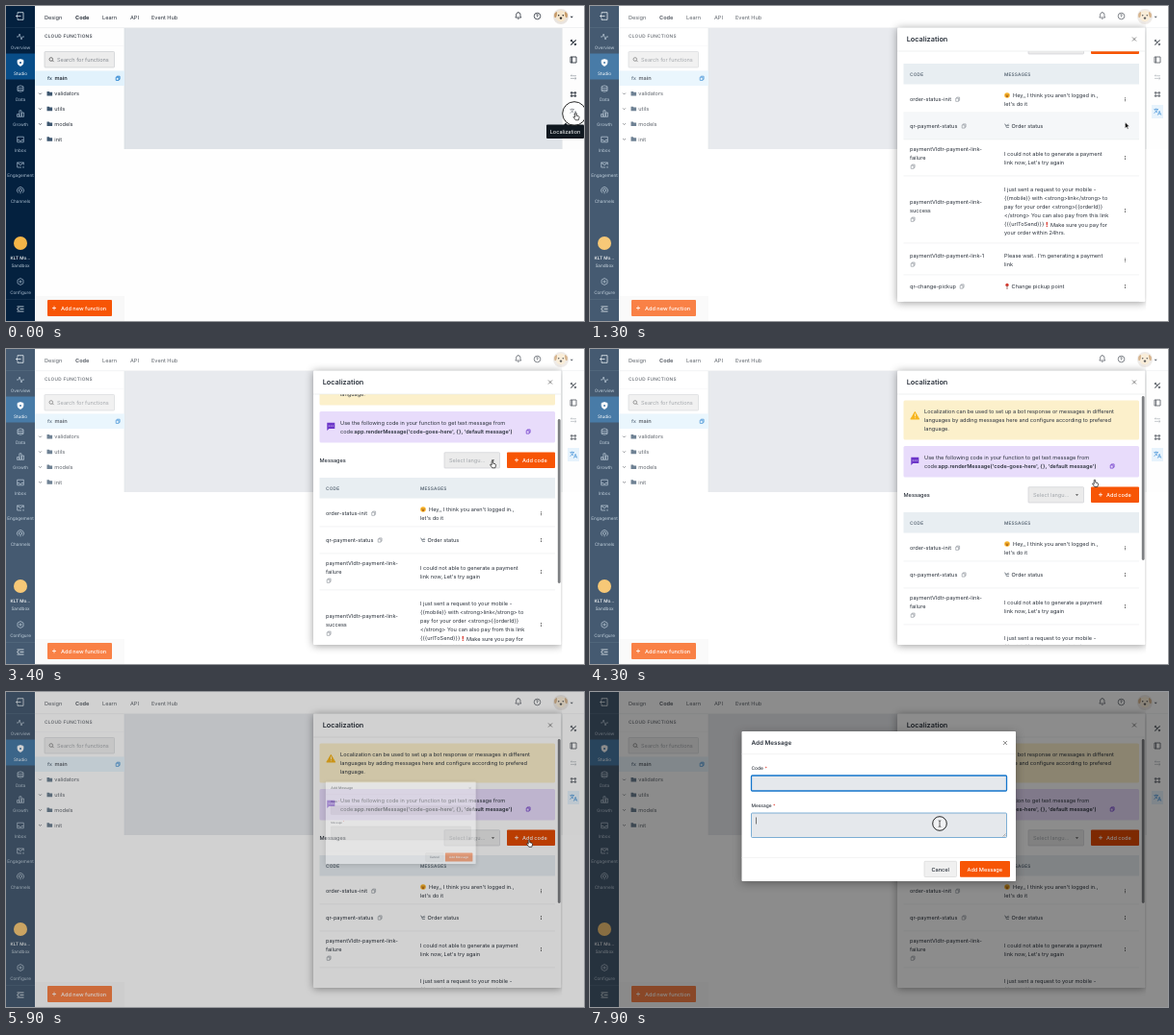
Animation of 600x328 px, one loop 8 s. Source, as an HTML page:

```html
<!DOCTYPE html>
<html lang="en">
<head>
<meta charset="utf-8">
<style>
html, body { margin: 0; width: 100%; height: 100%; overflow: hidden; background: #fff; }
svg { display: block; width: 100vw; height: 100vh; }
text { font-family: Inter, "Open Sans", sans-serif; text-rendering: geometricPrecision; white-space: pre; }
</style>
</head>
<body>
<svg id="stage" viewBox="0 0 600 328"></svg>
<script>
const LOOP = 8000, INK = '#2b323c', GREY = '#7b828b', ORANGE = '#f75505', BLUE = '#1476cc';

const text = (x, y, s, o = {}) => {
  const { size = 5.6, fill = INK, w = 400, a = 'start', ls = 0 } = o;
  const safe = s.replace(/</g, '&lt;');
  return `<text x="${x}" y="${y + size * .36}" font-size="${size}" font-weight="${w}" fill="${fill}" text-anchor="${a}" letter-spacing="${ls}">${safe}</text>`;
};
const rect = (x, y, w, h, fill, extra = '') =>
  `<rect x="${x}" y="${y}" width="${w}" height="${h}" fill="${fill}" ${extra}/>`;
const box = (x, y, w, h, fill, stroke) =>
  rect(x, y, w, h, fill, `rx=".8" stroke="${stroke}" stroke-width=".6"`);
const icon = (x, y, d, stroke = INK, w = .8, fill = 'none') =>
  `<path transform="translate(${x} ${y})" d="${d}" stroke="${stroke}" stroke-width="${w}" fill="${fill}" stroke-linejoin="round"/>`;
const dot = (x, y, r, fill) => `<circle cx="${x}" cy="${y}" r="${r}" fill="${fill}"/>`;
const lines = (x, ys, list, o) => list.map((s, i) => text(x, ys[i], s, o)).join('');

const COPY = 'M-1.8-1.1H1.1V2.1H-1.8ZM-.8-1.1V-2.1H2.1V1.1H1.1';
const CROSS = 'M-2-2L2 2M2-2L-2 2';
const PLUS = 'M-2 0H2M0-2V2';
const CARET = 'M-1.6-.8H1.6L0 1.1Z';
const copy = (x, y, c = GREY, w = .55) => icon(x, y, COPY, c, w);

function sidebar() {
  const items = [
    ['Overview', 32, 'M-4 0H-2L-.9-3L1 3L2 0H4'],
    ['Studio', 59, 'M0-3.6L3-2.6V0Q3 2.5 0 3.6Q-3 2.5-3 0V-2.6Z'],
    ['Data', 86, 'M-3-2.2Q0-4 3-2.2V2.4Q0 4-3 2.4ZM-3-1Q0 .5 3-1M-3 1Q0 2.5 3 1'],
    ['Growth', 112, 'M-3.5 3.3V.6H-1.4V3.3ZM-1.1 3.3V-3.2H1V3.3ZM1.4 3.3V-1H3.5V3.3Z'],
    ['Inbox', 139, 'M-3.3-2.8H3.3V2.8H-3.3ZM-3.3 .6H-1.2L-.6 1.6H.6L1.2 .6H3.3'],
    ['Engagement', 165.5, 'M3.3 0V-2.5H-3.3V2.5H1M-3.3-2.5L0 .3L3.3-2.5M2 2.4H4'],
    ['Channels', 192, 'M-2.4 2.6A3.5 3.5 0 1 1 2.4 2.6M-1.2 1.2A1.7 1.7 0 1 1 1.2 1.2M0 0V3.4'],
    ['Configure', 287, 'M0-3.5L3-1.8V1.8L0 3.5L-3 1.8V-1.8ZM-1 0A1 1 0 1 1 1 0A1 1 0 1 1-1 0']
  ];
  let s = rect(0, 0, 30, 328, '#04213f') + rect(0, 22, 30, .6, '#1d3b58') +
    rect(0, 49.5, 30, 27, '#084d88') + rect(0, 305, 30, .6, '#1d3b58');
  for (const [name, y, d] of items) {
    const on = name === 'Studio', c = on ? '#fff' : '#a9bccf';
    s += icon(15, y, d, c, .7, on ? '#fff' : 'none') +
      text(15, y + 11, name, { size: 4.65, fill: c, a: 'middle' });
  }
  return s + dot(15, 59, 1, '#084d88') +
    icon(14.5, 10.5, 'M-2.5-2V-3.8H3.5V3.8H-2.5V2M1 0H-4M-2.5-1.5L-4 0L-2.5 1.5', '#dfe7ee') +
    dot(15, 247, 7, '#f4b548') +
    text(15, 262, 'KLT Mo...', { size: 4.65, fill: '#fff', w: 500, a: 'middle' }) +
    text(15, 270, 'Sandbox', { size: 4.65, fill: '#b9c8d6', a: 'middle' }) +
    icon(15, 315.5, 'M-3.5-2.5H3.5M-.5 0H3.5M-3.5 2.5H3.5M-1.5-1.4L-3.5 0L-1.5 1.4', '#dfe7ee');
}

function topBar() {
  const tabs = [['Design', 40], ['Code', 72], ['Learn', 100], ['API', 129], ['Event Hub', 151]];
  return rect(30, 22.5, 570, .6, '#e4e6e8') +
    tabs.map(([s, x]) => text(x, 11.5, s, { w: s === 'Code' ? 700 : 400 })).join('') +
    icon(531.8, 10, 'M-3 2H3L2.2 .8V-1A2.2 2.2 0 0 0-2.2-1V.8ZM-.8 3.2H.8M0-3.2V-4') +
    icon(551.5, 10.5, 'M-3.3 0A3.3 3.3 0 1 1 3.3 0A3.3 3.3 0 1 1-3.3 0') +
    text(551.5, 10.5, '?', { size: 5, w: 700, a: 'middle' }) +
    dot(576, 11, 8, '#e9e4df') +
    icon(576, 11, 'M-5-4Q0-9 5-4L4.5 3Q0 8-4.5 3Z', 'none', 0, '#f6e6cc') +
    icon(576, 11, 'M-4-5Q-8-4-6.5 1Q-4 2-4-5M4-5Q8-4 6.5 1Q4 2 4-5', 'none', 0, '#c79a66') +
    dot(573.7, 9.8, .8, '#222') + dot(578.3, 9.8, .8, '#222') + dot(576, 12.6, 1.2, '#222') +
    icon(587.2, 11.5, CARET, 'none', 0, INK);
}

function functionList() {
  let s = rect(123, 23, 454.5, 126, '#dfe3e8') + rect(122.7, 23, .6, 126, '#d5d9dd') +
    text(40, 31.5, 'CLOUD FUNCTIONS', { size: 4.75, w: 500, ls: .25 }) +
    rect(30, 41, 93, .4, '#eceef0') +
    box(40, 47.5, 72.5, 16.5, '#ececec', '#c5c8cb') +
    icon(47, 55.5, 'M1.2 1.2L2.6 2.6M-2 0A1.8 1.8 0 1 1 1.6 0A1.8 1.8 0 1 1-2 0', '#555') +
    text(53, 56, 'Search for functions', { fill: '#858a90' }) +
    rect(30, 67.5, 93, 15.5, '#e2f2fc') +
    text(43, 75, 'fx', { size: 5, w: 600, fill: '#31495f' }) + text(50.5, 75.3, 'main', { w: 600 }) +
    copy(116, 75.3, BLUE, .8);
  ['validators', 'utils', 'models', 'init'].forEach((name, i) => {
    const y = 91.2 + i * 15.8;
    s += icon(35.5, y, 'M-1.4-.6L0 .8L1.4-.6', INK, .7) +
      icon(45.3, y, 'M-2.8-2.3H-.6L.2-1.4H2.8V2.2H-2.8Z', 'none', 0, '#3d566f') + text(50.3, y + .2, name);
  });
  return s + rect(30, 302, 93, 26, '#f8f8f8') + rect(43, 306, 67, 17, ORANGE, 'rx="1"') +
    icon(50, 314.5, PLUS, '#fff') + text(57, 314.5, 'Add new function', { fill: '#fff', w: 500 });
}

function rail() {
  return rect(577.5, 23, 22.5, 126, '#fdfdfd') + rect(577.3, 23, .5, 126, '#e2e4e6') +
    rect(583, 103, 12, 14, '#deeefb', 'id="railOn"') +
    icon(589, 38, 'M-2.7-2.7L2.7 2.7M2.7-2.7L-2.7 2.7M-3-1.4L-1.4-3M1.4 3L3 1.4', INK, 1.1) +
    icon(589, 56, 'M-3-3H3V3H-3ZM-1.5-3V3', INK, .9) +
    icon(589, 74, 'M-3-1.3H3M-1.6-2.5L-3-1.3M3 1.4H-3M1.6 .3L3 1.4L1.6 2.6', '#9aa0a6', .7) +
    icon(589, 92, 'M-3.2-1.7H3.2M-3.2 1.7H3.2M-1.9-3V3M1.9-3V3', INK, .9) +
    `<g id="lang">${icon(589, 110, 'M-3.6-2.4H1M-1.3-3.4V-2.4M.2-2.4Q-.8 .3-3.5 1.5M-2.6-1.8Q-1.5 .2 0 .8M.4 3.6L2.1-.6L3.8 3.6M1.1 2.2H3.1', 'currentColor', .75)}</g>`;
}

// Table rows: top, bottom, code lines, message lines
const rows = [
  [192, 221, ['order-status-init'], ['      Hey,, I think you aren\'t logged in.,', 'let\'s do it']],
  [221, 249, ['qr-payment-status'], ['     Order status']],
  [249, 287, ['paymentVldtr-payment-link-', 'failure'], ['I could not able to generate a payment', 'link now, Let\'s try again']],
  [287, 357, ['paymentVldtr-payment-link-', 'success'], [
    'I just sent a request to your mobile -', '{{mobile}} with <strong>link</strong> to',
    'pay for your order <strong>{{orderId}}', '</strong> You can also pay from this link',
    '{{{urlToSend}}}', 'your order within 24hrs.']],
  [357, 390, ['paymentVldtr-payment-link-1'], ['Please wait.. I\'m generating a payment', 'link']],
  [390, 418, ['qr-change-pickup'], ['     Change pickup point']]
];
const inlineCopy = { 0: 381.5, 1: 388, 5: 386 };

function table() {
  let s = rect(325.5, 170, 244.5, 21.5, '#e8eef2') +
    text(332, 181, 'CODE', { size: 4.75, fill: '#465564', w: 500, ls: .2 }) +
    text(430, 181, 'MESSAGES', { size: 4.75, fill: '#465564', w: 500, ls: .2 });
  rows.forEach(([top, end, code, msg], i) => {
    const mid = i === 5 ? 402 : i === 3 ? 323 : i === 4 ? 374.5 : (top + end) / 2 + (i ? 0 : .7);
    const n = code.length + (i in inlineCopy ? 0 : 1);
    const cy = code.map((_, k) => mid + (k - (n - 1) / 2) * 9.2);
    const my = msg.map((_, k) => mid + .4 + (k - (msg.length - 1) / 2) * 9.1);
    s += rect(325.5, top, 244.5, end - top, '#f5f7f9', 'class="hover"') +
      rect(325.5, end - .3, 244.5, .5, '#e3e6e9') + lines(332, cy, code) +
      (i in inlineCopy ? copy(inlineCopy[i], mid) : copy(335, mid + (n - 1) / 2 * 9.2)) +
      msg.map((m, k) => {
        const gap = m.length - m.trimStart().length;
        return text(430 + (gap ? gap === 6 ? 9 : 7.6 : 0), my[k], m.trim());
      }).join('') + [-1.5, 0, 1.5].map(d => dot(555.5, mid + d, .5, '#333')).join('');
  });
  return s + dot(433, 203, 2.8, '#fbb52b') + dot(432, 202.2, .45, '#5a3310') + dot(434, 202.2, .45, '#5a3310') +
    icon(433, 203.5, 'M-1.6 0H1.6Q0 2.6-1.6 0', 'none', 0, '#8a3b12') +
    icon(432.8, 235.2, 'M-2.6-2.3L-1.4-1.7L-.5 1.2H2.2M-1-.8H2.4M1.6-2.4L.6-1', '#59636d', .7) +
    text(473, 337.5, '!', { size: 7, fill: '#d92b20', w: 800 }) + text(478, 337.5, 'Make sure you pay for') +
    dot(433, 400.4, 1.7, '#d63a2f') + rect(432.6, 401, .8, 4, '#8b5550');
}

function panelBody() {
  return rect(325.5, 53.5, 244.5, 41, '#fcf0cb', 'rx="1.5"') +
    icon(337.3, 69.3, 'M0-4L4.5 3.8H-4.5Z', '#f6b51e', .8, '#f6b51e') + rect(337, 67.3, .7, 3, '#fff') + dot(337.35, 71.7, .45, '#fff') +
    lines(347, [65, 74.2, 83.4], ['Localization can be used to set up a bot response or messages in different',
      'languages by adding messages here and configure according to prefered', 'language.']) +
    rect(325.5, 101, 244.5, 32.5, '#e8dcfb', 'rx="1.5"') +
    icon(337.3, 116.5, 'M-4-3.8H4V2.6H-2L-4 4.4Z', 'none', 0, '#6c35c9') +
    [-2, 0, 2].map(d => dot(337.3 + d, 116, .55, '#fff')).join('') +
    text(347, 112.7, 'Use the following code in your function to get text message from') +
    text(347, 122.3, 'code:') +
    text(361.5, 122.3, 'app.renderMessage(\'code-goes-here\', {}, \'default message\')', { w: 600, size: 5.55 }) +
    copy(542, 122, '#6c35c9', .7) +
    text(325.5, 152.3, 'Messages', { w: 500 }) +
    box(455, 143.7, 57.5, 16.3, '#ebebeb', '#c9ccd0') +
    text(460, 152.3, 'Select langu...', { fill: '#a3a7ac' }) + icon(505.5, 152, CARET, 'none', 0, '#555') +
    rect(520, 143.5, 50, 16.5, ORANGE, 'rx="1" id="addBtn"') + icon(530, 151.7, PLUS, '#fff') +
    text(536, 152, 'Add code', { fill: '#fff', w: 500 }) + table() +
    text(325.5, 425.4, 'Showing') + box(350, 419, 19, 12.5, '#ebebeb', '#c9ccd0') +
    text(353.5, 425.4, '6') + icon(363, 425.3, CARET, 'none', 0, '#555') + text(371, 425.4, 'of 234') +
    text(488, 425.4, 'Go to') + box(506.5, 419, 20, 12.5, '#fff', '#c9ccd0') +
    text(516.5, 425.4, '2', { a: 'middle' }) + text(530.5, 425.4, '/ 39') +
    box(546, 419, 11.5, 12.5, '#fff', '#c9ccd0') + box(558, 419, 11.5, 12.5, '#fff', '#c9ccd0') +
    icon(551.7, 425.2, 'M2 0H-2M-.6-1.5L-2 0L-.6 1.5') + icon(563.7, 425.2, 'M-2 0H2M.6-1.5L2 0L.6 1.5');
}

function modal() {
  const label = (y, s, w) => text(167.5, y, s, { size: 4.85, w: 500 }) + text(168.6 + w, y - .5, '*', { size: 4.8, fill: '#e23b2e' });
  return rect(157.5, 41, 284.5, 156, '#fff', 'rx="1" style="filter:drop-shadow(0 2px 5px #0005)"') +
    text(167.5, 53, 'Add Message', { size: 6.3, w: 600 }) + icon(431, 53, CROSS, '#666', .7) +
    rect(157.5, 64.3, 284.5, .5, '#e8e8e8') + label(79.3, 'Code', 13) +
    rect(167.5, 87, 265, 16, '#e7e7e7', 'rx="1" id="codeBox"') + label(118.3, 'Message', 21.5) +
    rect(167.5, 126, 265, 25.5, '#e7e7e7', 'rx="1" id="msgBox"') +
    icon(430, 149, 'M-1.5 1.5L1.5-1.5M.2 1.5L1.5 .2', '#777', .5) +
    rect(172.3, 130.5, .6, 7, '#222', 'id="caret"') +
    rect(157.5, 172, 284.5, .5, '#e8e8e8') + box(347, 176.3, 33.5, 16.2, '#f0f0f0', '#d5d5d5') +
    text(363.7, 184.5, 'Cancel', { w: 500, a: 'middle' }) +
    rect(384, 176, 52, 16.8, ORANGE, 'rx="1"') + text(409.8, 184.5, 'Add Message', { w: 500, fill: '#fff', a: 'middle' });
}

const pointers = {
  hand: icon(0, 0, 'M-.8-2.2Q0-3.2 .7-2.2V.2L3 .8Q3.8 1.2 3.5 2.4L2.8 4.8H-.2L-2.4 1.7Q-2.4 .8-1.4 1.2L-.8 1.8Z', '#111', .7, '#fff'),
  arrow: icon(0, 0, 'M-1.5-3V3.2L0 2L1 4.2L2 3.8L1 1.6H3Z', '#fff', .5, '#111'),
  beam: icon(0, 0, 'M-1.3-3.2Q0-3.2 0-2.4Q0-3.2 1.3-3.2M0-2.4V2.6M-1.3 3.4Q0 3.4 0 2.6Q0 3.4 1.3 3.4', '#222', .7)
};

const $ = id => document.getElementById(id);
$('stage').innerHTML = `<defs>
  <clipPath id="left"><path d="M0 0H577.3V328H0Z"/></clipPath>
  <clipPath id="view"><path d="M319 47H577V308H319Z"/></clipPath></defs>` +
  rect(0, 0, 600, 328, '#fefefe') + sidebar() + topBar() + functionList() + rail() +
  `<g id="tip">${rect(561, 123.5, 39, 14.5, '#101820', 'rx="1"')}${icon(581, 122, 'M-2 2L0-.5L2 2Z', 'none', 0, '#101820')}${text(580.5, 130.7, 'Localization', { fill: '#fff', a: 'middle' })}</g>` +
  rect(0, 0, 600, 328, '#fff', 'id="veil"') +
  `<g clip-path="url(#left)"><g id="panel">
    ${rect(319, 22.5, 257.5, 285.5, '#fff', 'rx="1" style="filter:drop-shadow(0 1px 4px #0006)"')}
    <g clip-path="url(#view)"><g id="body">${panelBody()}</g></g>
    ${rect(319, 46.7, 257.5, .6, '#e4e6e8')}${text(328.7, 34, 'Localization', { size: 7.3, w: 600 })}
    ${icon(565, 34.5, CROSS, '#555', .7)}
    ${rect(572.8, 49, 2.8, 171, '#7d7f82', 'rx="1.4" id="thumb"')}</g></g>` +
  rect(0, 0, 600, 328, '#000', 'id="mask"') + `<g id="modal">${modal()}</g>` +
  '<circle id="ring" fill="#fff" fill-opacity=".45" stroke="#111" stroke-width=".9"/>' +
  Object.entries(pointers).map(([k, d]) => `<g id="${k}">${d}</g>`).join('');

const clamp = v => Math.max(0, Math.min(1, v));
const smooth = v => v * v * (3 - 2 * v);
const outQuint = v => 1 - (1 - v) ** 5;
function track(keys, t) {
  const i = keys.findIndex(k => k[0] > t);
  if (i < 1) return keys[i ? keys.length - 1 : 0].slice(1);
  const [a, b] = [keys[i - 1], keys[i]], u = smooth((t - a[0]) / (b[0] - a[0]));
  return a.slice(1).map((v, k) => v + (b[k + 1] - v) * u);
}

const path = [[0, 591.5, 114], [300, 591.5, 114], [900, 557, 124], [1500, 557, 124], [2100, 465, 195], [2500, 465, 195],
  [3400, 505, 119], [3900, 505, 121], [4700, 543, 156.5], [5900, 543, 156.5], [6200, 543, 159], [6800, 330, 96],
  [7100, 330, 96], [7800, 363, 137]];
const scroll = [[0, 0], [900, 0], [1300, 110], [2100, 130], [2500, 130], [3400, 36], [3900, 0]];
const clicks = [-100, 5700, 6800, 7900];
const shapes = [[0, 'hand'], [400, 'arrow'], [1800, 'beam'], [2700, 'arrow'], [3200, 'hand'], [6200, 'arrow'], [6700, 'beam']];

const show = (id, on) => $(id).style.display = on ? '' : 'none';
const set = (id, o) => { for (const k in o) $(id).setAttribute(k, o[k]); };
const hovers = document.querySelectorAll('.hover');

function draw(t) {
  const [x, y] = track(path, t), [s] = track(scroll, t);
  const open = outQuint(clamp((t - 100) / 400)), pop = clamp((t - 5850) / 350);
  const scale = .2 + .8 * (1 - (1 - pop) ** 3.7);

  show('tip', t < 300);
  show('railOn', t >= 100);
  $('lang').style.color = t >= 100 ? BLUE : INK;
  set('veil', { opacity: .26 * open });
  show('panel', open > 0);
  set('panel', { transform: `translate(${260 * (1 - open)} 0)` });
  set('body', { transform: `translate(0 ${-s})` });
  set('thumb', { y: 49 + s * .667 });
  show('thumb', t > 1300);
  set('addBtn', { fill: t >= 4600 ? '#e34a02' : ORANGE });
  hovers.forEach((h, i) => {
    const over = y > 47 && x > 325 && x < 570 && t < 5900 && open === 1;
    h.style.display = over && y + s >= rows[i][0] && y + s < rows[i][1] ? '' : 'none';
  });

  set('mask', { opacity: .45 * clamp((t - 5800) / 250) });
  show('modal', pop > 0);
  set('modal', { opacity: clamp(pop * 3), transform: `translate(543 157) scale(${scale}) translate(-543 -157)` });
  const code = t >= 6900, msg = t >= 7900;
  set('codeBox', { stroke: code ? BLUE : '#c4c4c4', 'stroke-width': code ? 1.3 : .6, fill: code ? '#e5e8ec' : '#e7e7e7' });
  set('msgBox', { stroke: msg ? '#5f9ccc' : '#c4c4c4', 'stroke-width': msg ? .8 : .6, fill: msg ? '#e5e8ec' : '#e7e7e7' });
  set('caret', { y: msg ? 130.5 : 91.5 });
  show('caret', msg || code && (t - 6900) % 1000 < 500);

  const hit = clicks.find(c => t >= c && t < c + 200);
  show('ring', hit !== undefined);
  if (hit !== undefined) set('ring', { cx: x - (t < 200 ? 1.5 : 0), cy: y - (t < 200 ? 2 : 0), r: 7.3 + (t - hit) * .05 });
  const shape = shapes.filter(k => k[0] <= t).pop()[1];
  for (const k in pointers) show(k, k === shape);
  set(shape, { transform: `translate(${x} ${y})` });
}

const start = performance.now();
function tick() {
  const t = (performance.now() - start) % LOOP;
  draw(Math.floor(t / 100) * 100);
  requestAnimationFrame(tick);
}
tick();
</script>
</body>
</html>
```
